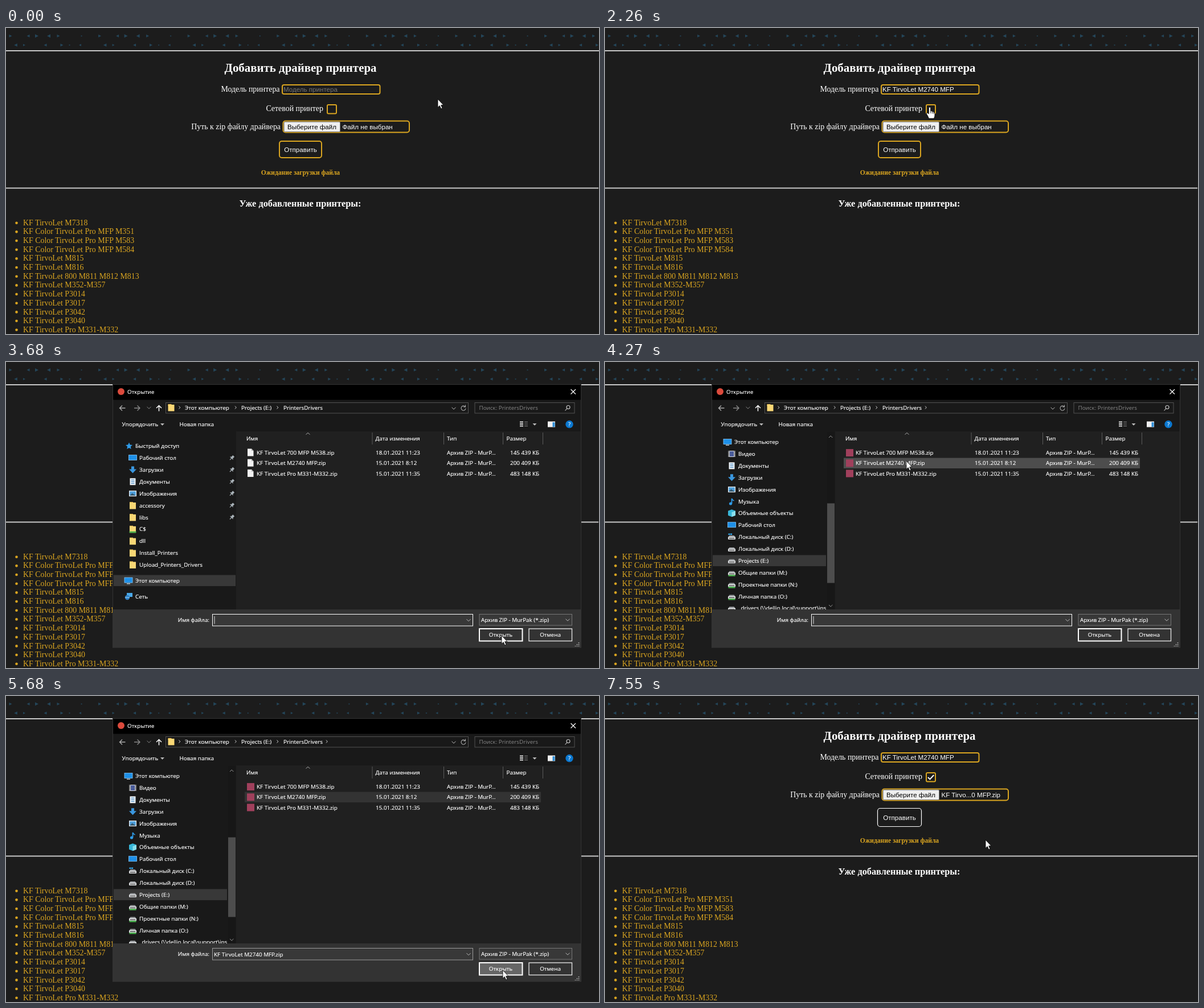
Animation, 1041 px wide and 538 px high, one loop 8000 ms. Source, as an HTML page:

```html
<!DOCTYPE html>
<html lang="ru">
<head>
<meta charset="utf-8">
<title>Добавить драйвер принтера</title>
<style>
html, body { margin: 0; width: 100%; height: 100%; overflow: hidden; background: #1c1c1c; }
svg { display: block; width: 1041px; height: 538px; }
text { white-space: pre; fill: #fff; }
.serif { font: 13.9px "Liberation Serif", serif; }
.gold { fill: #daa520; }
.h2 { font: bold 20.9px "Liberation Serif", serif; }
.h3 { font: bold 16.3px "Liberation Serif", serif; }
.h5 { font: bold 11.55px "Liberation Serif", serif; fill: #daa520; }
.sans { font: 11.6px "Liberation Sans", sans-serif; }
.ui { font: 9.85px "Open Sans", "Noto Sans", sans-serif; stroke: #fff; stroke-width: .18px; }
.mid { text-anchor: middle; }
.end { text-anchor: end; }
.dim { fill: #8a8a8a; stroke: none; }
.hint { fill: #757575; }
.ink { fill: #000; }
</style>
</head>
<body>
<svg id="stage" viewBox="0 0 1041 538"></svg>
<script>
const GOLD = '#daa520';
const LOOP = 8000;
const BRAND = 'KF TirvoLet';
const MODEL = 'KF TirvoLet M2740 MFP';

const text = (x, y, s, cls = 'ui', more = '') => `<text x="${x}" y="${y}" class="${cls}" ${more}>${s}</text>`;
const rect = (x, y, w, h, fill, more = '') => `<rect x="${x}" y="${y}" width="${w}" height="${h}" fill="${fill}" ${more}/>`;
const box = (x, y, w, h, stroke, sw = 1, r = 0, more = '') =>
  rect(x, y, w, h, 'none', `stroke="${stroke}" stroke-width="${sw}" rx="${r}" ${more}`);
const line = (d, stroke, sw = 1, more = '') => `<path d="${d}" fill="none" stroke="${stroke}" stroke-width="${sw}" ${more}/>`;
const fill = (d, color, more = '') => `<path d="${d}" fill="${color}" ${more}/>`;
const dot = (x, y, r, color) => `<circle cx="${x}" cy="${y}" r="${r}" fill="${color}"/>`;
const group = (id, s, more = '') => `<g id="${id}" ${more}>${s}</g>`;

// Page

const printers = [
  'KF TirvoLet M7318', 'KF Color TirvoLet Pro MFP M351', 'KF Color TirvoLet Pro MFP M583',
  'KF Color TirvoLet Pro MFP M584', 'KF TirvoLet M815', 'KF TirvoLet M816',
  'KF TirvoLet 800 M811 M812 M813', 'KF TirvoLet M352-M357', 'KF TirvoLet P3014',
  'KF TirvoLet P3017', 'KF TirvoLet P3042', 'KF TirvoLet P3040', 'KF TirvoLet Pro M331-M332'
];

// Repeating strip of small triangles: [x, y, signed size]
function strip() {
  const marks = [[8, 14, 2.5], [39, 14, -2.5], [54, 14, 3], [75, 14, -3], [92, 14, 2.5], [133, 14, 1.3],
    [17, 30, -2.8], [32, 30, 2], [69, 30, -2.5], [98, 30, 2.5], [112, 30, 1.3], [130, 30, -2]];
  let d = '';
  for (let k = 0; k < 7; k++)
    for (const [x, y, s] of marks) {
      const a = Math.abs(s);
      d += `M${x + k * 156.6 - s} ${y - a}l${2 * s} ${a}l${-2 * s} ${a}z`;
    }
  return fill(d, '#24465a');
}

function page() {
  return rect(0, 0, 1041, 538, '#1c1c1c') + strip() +
    rect(0, 39, 1041, 2, '#c8c8c8') + rect(0, 280.5, 1040, 2, '#c8c8c8') +
    text(517, 77, 'Добавить драйвер принтера', 'h2 mid') +
    text(480.5, 112, 'Модель принтера', 'serif end') +
    box(485, 100, 171.5, 16, GOLD, 2, 3, 'id="field"') +
    group('fieldRing', box(483.5, 98.5, 174.5, 19, '#fff', 1, 4)) +
    text(487, 112, 'Модель принтера', 'sans hint', 'id="hint"') +
    text(487, 112, MODEL, 'sans', 'id="model"') +
    rect(487, 102, 1, 13, '#fff', 'id="caret"') +
    text(557, 145.5, 'Сетевой принтер', 'serif end') +
    box(564, 135, 16, 15.5, GOLD, 2, 2) +
    line('M567 143l3.4 3.4 6.8-7.4', '#fff', 2, 'id="tick"') +
    text(482, 177.5, 'Путь к zip файлу драйвера', 'serif end') +
    box(486.5, 163.5, 221.5, 20, GOLD, 2, 4) +
    rect(488, 165, 98.5, 17.5, '#efefef', 'id="pick" stroke="#767676" rx="1.5"') +
    text(494, 177.5, 'Выберите файл', 'sans ink') +
    text(590.5, 177.5, '', 'sans', 'id="chosen"') +
    box(480, 199, 74, 29, GOLD, 2, 4, 'id="send"') +
    group('sendRing', box(478.5, 197.5, 77, 32, '#fff', 1.2, 4.5)) +
    text(517, 217.5, 'Отправить', 'sans mid') +
    text(517, 258, 'Ожидание загрузки файла', 'h5 mid') +
    text(516.5, 313.5, 'Уже добавленные принтеры:', 'h3 mid') +
    printers.map((p, i) => dot(18.5, 342.7 + i * 15.67, 2.3, GOLD) +
      text(30, 346.8 + i * 15.67, p, 'serif gold')).join('');
}

const suggestions = () => rect(484, 119, 195, 195, '#292a2d', 'rx="2" stroke="#3c3d40"') +
  printers.slice(-7).map((p, i) => text(491, 137 + i * 27, p, 'sans')).join('');

// Icons, centred on (0, 0)

const drive = fill('M-4-2.5h8l2.5 3h-13z', '#9a9da0') + rect(-6.5, 0, 13, 4.5, '#eceef0', 'rx="1"') + rect(-5, 1.5, 10, 1.5, '#444');
const screen = rect(-7, -5, 14, 9, '#1e90e8') + rect(-7, -5, 14, 9, 'none', 'stroke="#8ac8f5" stroke-width=".8"');
const folder = rect(-5.5, -6, 6, 3, '#e6b94d') + rect(-5.5, -5, 11, 11.5, '#f8d775');
const icons = {
  star: fill('M0-6l1.8 4 4.2.5-3.2 2.8.9 4.2L0 3.4-3.7 5.5l.9-4.2L-6-1.5l4.2-.5z', '#2f9be8'),
  desk: screen,
  down: fill('M-2.5-6h5v5h4L0 6-6.5-1h4z', '#3a96dd'),
  doc: rect(-5, -6, 10, 12, '#eef3f8') + line('M-3-3h6M-3 0h6M-3 3h6', '#4a8cc4', 1.3),
  pic: rect(-6.5, -5, 13, 10, '#eef3f8') + rect(-5.3, -3.8, 10.6, 7.6, '#4d9fdc') + fill('M-5.3 3.8L-1-.5 5.3 3.8z', '#375a70'),
  folder,
  share: folder + rect(-6, 4, 12, 2.5, '#46b04a'),
  pc: screen + rect(-3, 5, 6, 1.5, '#b5c3cc'),
  net: rect(-3, -6, 10, 7, '#4aa8e8') + dot(-2, 2, 4.2, '#2c7fc4') + line('M-6 2h8', '#a9d9f5'),
  film: rect(-6, -5.5, 12, 11, '#d5d8dd') + rect(-3.5, -4.5, 7, 9, '#4a5c9b') + line('M-4.8-5v10M4.8-5v10', '#222', 1.2, 'stroke-dasharray="1.5 1.5"'),
  note: line('M0 4V-5q1 3 4 4', '#2f9be8', 1.8) + dot(-2, 4, 2.6, '#2f9be8'),
  cube: fill('M0-6.5L6.5-4v8L0 6.5-6.5 4v-8z', '#37b6d8') + fill('M0-1.5l6.5-2.5v8L0 6.5z', '#8be0ee'),
  drive,
  sys: drive + fill('M-6-6h3v2.5h-3zM-2.4-6h3v2.5h-3z', '#35a9ee'),
  mapped: drive + rect(-6, 4, 12, 2.5, '#46b04a')
};
const icon = (name, x, y) => `<g transform="translate(${x} ${y})">${icons[name]}</g>`;

// File dialog

const tree = (rows, y) => rows.map(([kind, s], i) =>
  icon(kind, 222.5, y + i * 20.87) + text(234, y + 3.6 + i * 20.87, s)).join('');

const quick = [['desk', 'Рабочий стол'], ['down', 'Загрузки'], ['doc', 'Документы'], ['pic', 'Изображения'],
  ['folder', 'accessory'], ['folder', 'libs'], ['share', 'C$'], ['folder', 'dll'],
  ['folder', 'Install_Printers'], ['folder', 'Upload_Printers_Drivers']];
const places = [['film', 'Видео'], ['doc', 'Документы'], ['down', 'Загрузки'], ['pic', 'Изображения'],
  ['note', 'Музыка'], ['cube', 'Объемные объекты'], ['desk', 'Рабочий стол'], ['sys', 'Локальный диск (C:)'],
  ['drive', 'Локальный диск (D:)'], ['drive', 'Projects (E:)'], ['mapped', 'Общие папки (M:)'],
  ['mapped', 'Проектные папки (N:)'], ['mapped', 'Личная папка (O:)'], ['mapped', '_drivers (\\\\dellin.local\\support\\ins']];
const files = [[BRAND + ' 700 MFP M538.zip', '18.01.2021 11:23', '145 439 КБ'],
  [MODEL + '.zip', '15.01.2021 8:12', '200 409 КБ'],
  [BRAND + ' Pro M331-M332.zip', '15.01.2021 11:35', '483 148 КБ']];
const rowY = i => 159.6 + i * 18.2;

const pin = y => `<g transform="translate(396.5 ${y}) rotate(45)">${rect(-2, -4.5, 4, 5, '#a9b2b8')}${line('M-3.5 .5h7M0 0v5', '#a9b2b8', 1.2)}</g>`;
const chevron = (x, id = '') => line(`M${x} 77.5l2.3 2.5-2.3 2.5`, '#ccc', 1, id);
const vee = (x, y, color = '#bbb') => line(`M${x - 3.5} ${y - 1.8}l3.5 3.5 3.5-3.5`, color);

const navFirst = () => icon('star', 216, 147.5) + text(227, 151, 'Быстрый доступ') + tree(quick, 168.6) +
  quick.slice(0, 6).map((_, i) => pin(168.6 + i * 20.87)).join('') +
  rect(189, 374.5, 214, 19.5, '#383838') + icon('pc', 215, 384) + text(227, 387.6, 'Этот компьютер') +
  icon('net', 215, 412) + text(227, 415.6, 'Сеть');

const navScrolled = () => rect(189, 339.5, 199, 19.5, '#383838') +
  icon('pc', 215, 140.5) + text(227, 144, 'Этот компьютер') +
  `<g clip-path="url(#navClip)">${tree(places, 161.5)}</g>` +
  rect(390, 123, 13, 312, '#171717') + rect(390, 248.5, 13, 140, '#4d4d4d') +
  line('M393 133l3.2-3.2 3.2 3.2M393 427l3.2 3.2 3.2-3.2', '#999');

const pageIcon = y => fill(`M424 ${y - 7}h7l3.5 3.5v9.5h-10.5z`, '#f2f2f2') + fill(`M431 ${y - 7}v3.5h3.5z`, '#aaa');

function fileList() {
  return ['Имя', 'Дата изменения', 'Тип', 'Размер'].map((s, i) => text([422, 648.5, 774, 878.5][i], 138.3, s)).join('') +
    line('M643 124v21M768.5 124v21M872.5 124v21M942.5 124v21', '#5a5a5a') +
    line('M526.5 127.5l3.5-3 3.5 3', '#aaa') +
    files.map((_, i) => rect(419, rowY(i) - 9.2, 520, 18.4, 'none', `id="row${i}"`)).join('') +
    group('plainIcons', files.map((_, i) => pageIcon(rowY(i))).join('')) +
    group('zipIcons', files.map((_, i) => rect(423, rowY(i) - 6.5, 13, 13, '#a0405c')).join('')) +
    files.map(([name, date, size], i) => {
      const y = rowY(i) + 3.6;
      return text(440, y, name) + text(649, y, date) + text(774, y, 'Архив ZIP - MurP...') + text(936, y, size, 'ui end');
    }).join('');
}

function dialogBody() {
  return rect(188, 66, 821, 436, '#191919') + rect(404, 122, 605, 313, '#202020') +
    line('M209.5 81h-10m4.5-4.5L199.5 81l4.5 4.5', '#aaa', 1.4) +
    line('M225 81h10m-4.5-4.5L235 81l-4.5 4.5', '#888', 1.4) + vee(251, 80.5, '#888') +
    line('M268.5 86.5v-10m-4.5 4.5l4.5-4.5 4.5 4.5', '#fff', 1.5) +
    box(280.5, 71.5, 531, 18.5, '#535353') + icon('folder', 290, 80) +
    chevron(303.5) + chevron(402) + chevron(475.5) + chevron(562, 'id="lastChevron"') +
    text(314, 83.5, 'Этот компьютер') + text(413, 83.5, 'Projects (E:)') + text(487, 83.5, 'PrintersDrivers') +
    vee(786, 81.5) + line('M806 78.5a4 4 0 1 0 1 3M806.5 75.5v3.5h-3.5', '#aaa', 1.1) +
    box(823, 71.5, 175, 18.5, '#535353') + text(830.5, 83.8, 'Поиск: PrintersDrivers', 'ui dim') +
    line('M981.5 85.5l3.2-3.5M990 79.5a3 3 0 1 1-6 0a3 3 0 1 1 6 0', '#ccc', 1.1) +
    text(203.5, 113, 'Упорядочить') + fill('M271 108h7l-3.5 3.7z', '#bbb') + text(304.5, 113, 'Новая папка') +
    line('M902 105.5h6M902 109h6M902 112.5h6', '#ddd', 2) + line('M910 105.5h6M910 109h6M910 112.5h6', '#888') +
    fill('M924.5 108h7l-3.5 3.7z', '#bbb') +
    rect(951, 104.5, 13, 10, '#f0f0f0') + rect(959.5, 106, 4, 8, '#2f8fd8') +
    dot(989, 109.5, 6.7, '#0b78d0') + text(989, 113.3, '?', 'ui mid', 'font-weight="bold"') +
    group('navFirst', navFirst()) + group('navScrolled', navScrolled()) + fileList() +
    rect(188, 435, 821, 67, '#333') +
    text(357, 457.3, 'Имя файла:', 'ui end') +
    rect(362.5, 443.5, 457, 20.5, '#383838', 'id="nameBox"') + vee(812, 454) +
    text(365, 457.5, files[1][0], 'ui', 'id="fileName"') + rect(365.5, 447, 1, 13.5, '#ddd', 'id="nameCaret"') +
    rect(831, 443.5, 162.5, 19.5, '#383838', 'stroke="#777"') + text(834, 457.3, 'Архив ZIP - MurPak (*.zip)') + vee(986, 453.5) +
    rect(831, 469, 75.5, 21.5, '#333', 'id="open" stroke="#fff" stroke-width="2"') + text(868.5, 483, 'Открыть', 'ui mid') +
    rect(918, 469, 75.5, 21.5, '#333', 'stroke="#e0e0e0" stroke-width="1.4"') + text(955.5, 483, 'Отмена', 'ui mid') +
    line('M1005.5 493v7M1002.5 496v4M999.5 499v1', '#bbb', 1.6, 'stroke-dasharray="1.5 1.5"');
}

const dialog = () => group('body', dialogBody()) + rect(187.5, 39.5, 822, 27, '#000') +
  box(187.5, 39.5, 822, 462.5, '#343434') +
  dot(202, 52, 6, '#db4a3c') + text(213, 56.3, 'Открытие') +
  line('M991.5 48l8.5 8.5m0-8.5l-8.5 8.5', '#fff', 1.2);

// Pointer shapes, hot spot at (0, 0)

const edge = 'stroke="#000" stroke-width=".8"';
const pointer = group('arrow', fill('M0 0V14.5L3.3 11.5 5.7 17 8 16 5.7 10.6H10z', '#fff', edge)) +
  group('beam', line('M-3-7.5q3 0 3 2v11q0 2-3 2M3-7.5q-3 0-3 2v11q0 2 3 2', '#fff')) +
  group('hand', fill('M-1.6 1.6Q-1.6 0 0 0T1.6 1.6V7Q4 6 4.4 8Q6.6 7 7 9Q9 9 9 11V15Q9 17 7.5 20H-1.5Q-3 16-5.6 12Q-6 10-4 10.3L-1.6 12z', '#fff', edge) +
    line('M1.6 7v4M4.4 8v3.5M7 9v3', '#000', .8));

const stage = document.getElementById('stage');
stage.innerHTML = '<clipPath id="navClip"><rect x="188" y="122" width="201" height="313"/></clipPath>' +
  page() + group('drop', suggestions()) + group('dialog', dialog()) + group('pointer', pointer);

const el = {};
for (const node of stage.querySelectorAll('[id]')) el[node.id] = node;
const show = (id, on) => el[id].setAttribute('visibility', on ? 'inherit' : 'hidden');
const set = (id, name, value) => el[id].setAttribute(name, value);
const clamp = v => Math.min(1, Math.max(0, v));
const within = (t, a, b) => t >= a && t < b;

// Pointer path: [ms, x, y]
const path = [[0, 758, 125], [30, 758, 125], [480, 630, 107], [1410, 630, 107], [1650, 684, 128], [1800, 684, 128],
  [2200, 569, 136], [2250, 570, 139], [2650, 570, 139], [3350, 545, 173], [3500, 545, 173], [3500, 870, 481],
  [3720, 870, 481], [4270, 529, 174], [4700, 529, 174], [5340, 872, 482], [5780, 872, 482],
  [6470, 530, 211], [6500, 529, 210], [7150, 529, 210], [7550, 668, 253], [LOOP, 668, 253]];

function pointerAt(t) {
  const i = path.findIndex(p => p[0] > t);
  const [t0, x0, y0] = path[i - 1], [t1, x1, y1] = path[i];
  const u = (t - t0) / (t1 - t0), e = u * u * (3 - 2 * u);
  return [x0 + (x1 - x0) * e, y0 + (y1 - y0) * e];
}

function render(t) {
  const [x, y] = pointerAt(t);
  const over = (l, top, r, b) => x >= l && x <= r && y >= top && y <= b;
  const modal = within(t, 3500, 5920);
  const focus = within(t, 500, 1700);
  const pasted = t >= 1200;

  show('field', !focus);
  show('fieldRing', focus);
  show('hint', !pasted);
  show('model', pasted);
  show('caret', within(t, 520, 1050) || within(t, 1200, 1700));
  set('caret', 'x', pasted ? 488 + el.model.getComputedTextLength() : 487);
  show('drop', within(t, 500, 1230));
  set('drop', 'opacity', 1 - clamp((t - 1190) / 40));
  show('tick', t >= 2480);
  set('pick', 'fill', within(t, 3500, 5780) || over(488, 165, 586, 182) ? '#e5e5e5' : '#efefef');
  el.chosen.textContent = t < 5780 ? 'Файл не выбран' : 'KF Tirvo...0 MFP.zip';
  show('send', t < 6900);
  show('sendRing', t >= 6900);

  const closing = clamp((t - 5770) / 150);
  const scale = 1 - .06 * closing;
  show('dialog', modal);
  set('dialog', 'opacity', clamp((t - 3490) / 70) * (1 - closing));
  set('dialog', 'transform', `translate(598 271) scale(${scale}) translate(-598 -271)`);
  show('body', modal && t >= 3640);
  const loaded = t >= 3780;
  show('navFirst', !loaded);
  show('navScrolled', loaded);
  show('lastChevron', loaded);
  show('plainIcons', !loaded);
  show('zipIcons', loaded);

  const picked = t >= 4670;
  files.forEach((_, i) => {
    const hover = over(419, rowY(i) - 9.1, 939, rowY(i) + 9.1);
    const chosen = picked && i === 1;
    set('row' + i, 'fill', chosen ? (t < 5680 ? '#777' : '#333') : hover ? '#4d4d4d' : 'none');
  });
  show('fileName', picked);
  show('nameCaret', !picked);
  set('nameBox', 'stroke', picked ? '#9b9b9b' : '#fff');
  set('open', 'fill', t >= 5680 ? '#666' : picked && over(831, 469, 907, 491) ? '#454545' : '#333');

  const beam = !modal && over(484, 99, 657, 117);
  const hand = !modal && over(563, 134, 581, 151);
  show('beam', beam);
  show('hand', hand);
  show('arrow', !beam && !hand);
  set('pointer', 'transform', `translate(${x.toFixed(1)} ${y.toFixed(1)})`);
}

function tick() {
  render(performance.now() % LOOP);
  requestAnimationFrame(tick);
}
tick();
</script>
</body>
</html>
```
